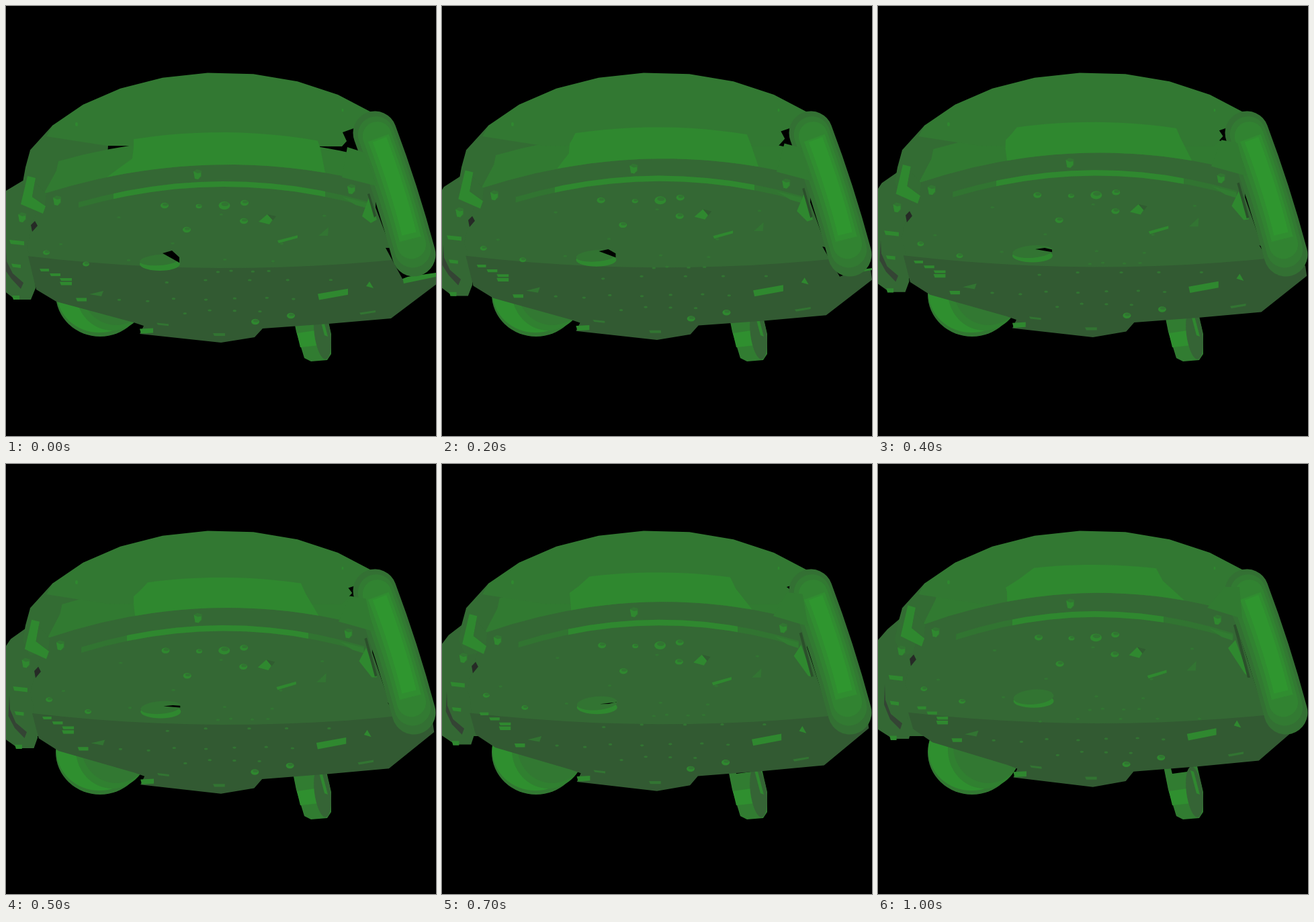
Recreate the animation shown at these times as an HTML page with a canvas. Size 640 px wide and 640 px high, loop 2100 ms.

```html
<!DOCTYPE html>
<html lang="en">
<head>
<meta charset="utf-8">
<title>Tilting shell</title>
<style>
html, body { margin: 0; width: 100%; height: 100%; overflow: hidden; background: #000; }
canvas { display: block; }
</style>
</head>
<body>
<canvas id="stage" width="640" height="640"></canvas>
<script>
const ctx = document.getElementById('stage').getContext('2d');
const LOOP = 2100, STEP = 100, STEPS = 10;
const CREST = 0.00058;
const C = {
  cover: '#327832', mid: '#317a31', bright: '#2f882f', main: '#346834',
  low: '#325a32', back: '#336c33', lit: '#2f8f2f', dim: '#327432'
};
let p = 0;

const lerp = (a, b, k = p) => a + (b - a) * k;
const mix = (a, b, k = p) => a.map((v, i) => lerp(v, b[i], k));

// Pitch of the shell: upper points rise most, sides draw inward.
function tilt(x, y) {
  const k = y - 260;
  return [x + (310 - x) * (0.044 - 0.0001 * k) * p, y + (0.09 * k - 42) * p];
}

function tilted(pts) {
  const out = [];
  for (let i = 0; i < pts.length; i += 2) out.push(...tilt(pts[i], pts[i + 1]));
  return out;
}

// Points on a shallow parabola with its top at (cx, y).
function arc(x0, x1, y, bend, cx = 325, n = 12) {
  const out = [];
  for (let i = 0; i <= n; i++) {
    const x = lerp(x0, x1, i / n);
    out.push(x, y + bend * (x - cx) ** 2);
  }
  return out;
}

// Corners of the faceted dome, 12.7 degrees apart.
function dome(from, to) {
  const out = [];
  for (let i = from; i <= to; i++) {
    const a = (9 + 12.7 * i) * Math.PI / 180;
    out.push(320 + 308 * Math.sin(a), 287 - 188 * Math.cos(a));
  }
  return out;
}

function seeded(seed) {
  return () => (seed = (seed * 16807) % 2147483647) / 2147483647;
}

function poly(color, pts) {
  ctx.fillStyle = color;
  ctx.beginPath();
  for (let i = 0; i < pts.length; i += 2) ctx.lineTo(pts[i], pts[i + 1]);
  ctx.fill();
}

const part = (color, pts) => poly(color, tilted(pts));

function oval(color, x, y, rx, ry, rot = 0) {
  ctx.fillStyle = color;
  ctx.beginPath();
  ctx.ellipse(x, y, rx, ry, rot, 0, Math.PI * 2);
  ctx.fill();
}

function wheels() {
  oval('#327832', 140, 429, 66, 63);
  oval(C.lit, 139, 426, 64, 60);
  oval('#308030', 158, 425, 54, 58);
  oval(C.cover, 164, 420, 52, 55);

  poly('#317c31', [424, 445, 432, 485, 444, 524, 454, 529, 478, 527, 484, 518, 484, 488, 474, 445]);
  poly(C.lit, [433, 487, 460, 483, 466, 505, 438, 508]);
  poly('#000', [434, 445, 470, 445, 460, 458, 438, 461]);
  oval('#356435', 471, 488, 12, 38, -0.13);
  poly(C.bright, [465, 456, 470, 458, 479, 492, 474, 490]);
}

function leftSide() {
  poly(C.main, mix(
    [-14, 300, 0, 275, 25, 260, 60, 262, 50, 330, 42, 365, 44, 420, 37, 437, 14, 437, -8, 420],
    [0, 262, 14, 246, 34, 229, 66, 226, 60, 290, 48, 335, 50, 395, 46, 409, 22, 409, 0, 395]));
  poly('#344434', mix(
    [0, 362, 1, 380, 10, 398, 26, 412, 22, 421, 8, 406, -2, 392],
    [10, 328, 11, 351, 19, 372, 36, 386, 33, 395, 18, 380, 9, 358]));
  bar(5, 351, 22, 6, 0.1);
  bar(8, 386, 14, 5, 0.1);
  bar(9, 434, 11, 6);
}

function cover() {
  poly(C.back, [25, 262, 29, 240, ...dome(-6, -5), 152, 207, 150, 240, 60, 280, 35, 285]);
  part(C.mid, [...arc(78, 535, 197, CREST, 320), ...arc(551, 55, 238, CREST, 330), 75, 245]);
  poly(C.cover, [60, 194, ...dome(-5, 3), 551, 164, 525, 181, 500, 209, 150, 208]);
  oval(C.bright, 105, 176, 2, 3);
  oval(C.bright, 501, 155, 1.5, 2.5);
}

function tube() {
  const bottom = lerp(218, 182);
  poly('#000', [lerp(501, 518), lerp(188, 181), 526, 179, 530, bottom, lerp(513, 524), bottom - 4]);
  poly('#000', mix([565, 360, 574, 360, 606, 400, 590, 406], [571, 350, 575, 360, 606, 390, 600, 390]));

  // Nested strokes shade the rounded surface from rim to highlight.
  const layers = 5;
  for (let i = 0; i < layers; i++) {
    const k = i / (layers - 1), inset = 14 * k;
    ctx.strokeStyle = `rgb(${lerp(51, 47, k)},${lerp(112, 150, k)},${lerp(51, 47, k)})`;
    ctx.lineWidth = lerp(65, 22, k);
    ctx.lineCap = i < 3 ? 'round' : 'butt';
    ctx.beginPath();
    ctx.moveTo(549 + inset * 0.5, 189 + inset * 0.7);
    ctx.quadraticCurveTo(582 + 3 * k, 277, 607 - inset * 0.5, 370 - inset * 2.2);
    ctx.stroke();
  }
  poly(C.mid, mix([508, 210, 533, 218, 552, 268, 500, 255], [516, 183, 538, 183, 542, 230, 490, 214]));
}

function shell() {
  const seam = arc(lerp(33, 45), lerp(598, 606), lerp(390, 386), -0.0002, 330);
  poly(C.main, [...tilted([...arc(55, 551, 236, CREST, 330), 550, 300]),
    575, lerp(366, 370), 600, 405, 45, 405, ...tilted([36, 372, 31, 360, 40, 322])]);
  poly(C.low, [...seam, ...tilted([592, 404, 640, 398, 642, 413, 573, 465, 480, 473, 382, 480,
    370, 493, 320, 501, 199, 488, 205, 476, 190, 471, 75, 440, 45, 422])]);

  // Lit step above the crest, its ends narrowing as it rises.
  const xl = lerp(190, 232), xr = lerp(464, 414), top = lerp(188, 150);
  const heel = 192 - 42 * Math.max(0, 1 - 2.5 * p);
  poly(C.bright, [...arc(xl, xr, top, 0.0006, 320), xr + lerp(4, 10), top + 24,
    ...tilted(arc(lerp(475, 463), heel + (heel - 310) * 0.046 * p, 236, CREST, 330)),
    lerp(188, 192), lerp(227, 190), 190, lerp(210, 184), lerp(190, 209), lerp(205, 172)]);

  const strip = tilted([...arc(108, 538, 261, 0.00066), ...arc(538, 108, 269, 0.00066)]);
  poly('#317431', strip);
  const x0 = lerp(160, 200), x1 = lerp(475, 425);
  ctx.save();
  ctx.beginPath();
  ctx.rect(x0, 180, x1 - x0, 130);
  ctx.clip();
  poly(C.bright, strip);
  ctx.restore();
}

function stud(x, y, r) {
  [x, y] = tilt(x, y);
  oval(C.bright, x, y, r, r * 0.7);
  oval(C.dim, x + 1, y - r * 0.25, r * 0.65, r * 0.35);
}

function screw(x, y) {
  [x, y] = tilt(x, y);
  poly(C.dim, [x - 6, y - 5, x - 1, y - 8, x + 6, y - 6, x + 6, y + 3, x + 1, y + 7, x - 4, y + 6]);
  poly(C.bright, [x - 6, y - 5, x, y - 2, x + 5, y - 3, x + 5, y + 2, x + 1, y + 7, x - 4, y + 6]);
}

// Flat plate: left end at (x, y), slope is rise per pixel.
function bar(x, y, len, h, slope = 0, color = C.bright) {
  const end = y + len * slope;
  part(color, [x, y - h / 2, x + len, end - h / 2, x + len, end + h / 2, x + 2, y + h / 2]);
}

function specks() {
  const rnd = seeded(7);
  const row = (x0, x1, y, gap) => {
    for (let x = x0; x <= x1; x += gap) {
      const [sx, sy] = tilt(x + 8 * rnd() - 4, y + 6 * rnd() - 3);
      oval(C.dim, sx, sy, 2.8, 1.6);
    }
  };
  row(172, 480, 312, 150);
  row(83, 480, 353, 163);
  row(180, 400, 380, 72);
  row(312, 400, 394, 26);
  row(236, 520, 409, 62);
  row(165, 450, 437, 44);
  row(265, 400, 455, 38);
}

function details() {
  specks();
  screw(285, 251);
  screw(76, 290);
  screw(514, 273);
  screw(24, 315);
  stud(236, 297, 6);
  stud(287, 298, 4.5);
  stud(325, 297, 8.5);
  stud(355, 293, 6);
  stud(354, 320, 6);
  stud(269, 333, 6);
  stud(371, 470, 6);
  stud(424, 461, 6);
  stud(60, 367, 5);
  stud(119, 384, 5);

  bar(404, 351, 30, 4, -0.26);
  bar(464, 433, 45, 9, -0.17);
  bar(526, 458, 24, 3, -0.15, C.dim);
  bar(224, 473, 18, 3, 0.1, C.dim);
  bar(308, 489, 18, 4, 0, C.dim);
  bar(199, 484, 20, 7, -0.05);
  for (let i = 0; i < 3; i++) bar(50 + 15 * i, 393 + 7 * i, 14 + 2 * i, 4);
  bar(80, 413, 18, 5);
  bar(104, 437, 16, 5);
  part(C.bright, [376, 321, 389, 310, 397, 318, 392, 325]);
  part('#315c31', [389, 310, 402, 313, 397, 319]);
  part(C.dim, [465, 342, 480, 329, 479, 342]);
  part(C.bright, [536, 417, 541, 410, 547, 420]);
  part(C.dim, [124, 429, 145, 424, 142, 432]);

  // Hook and hole on the left rim.
  part(C.bright, [32, 253, 44, 256, 39, 284, 59, 298, 55, 309, 22, 295]);
  part(C.back, [43, 262, 60, 280, 58, 297, 39, 284]);
  part('#262a26', [37, 326, 43, 320, 47, 327, 39, 336]);

  // Round port with its closing slit.
  const [x, y] = tilt(229, 380);
  oval(C.bright, x, y + 4, 30, 10);
  oval(C.dim, x, y - 2, 30, lerp(8, 11), -0.08);
  const open = Math.max(0, 1 - p / 0.75);
  poly('#000', [x + 4, y - 12 * open, x + 18, y - 16 * open, x + 29, y - 4 - 2 * open, x + 29, y - 4 + 6 * open]
    .map((v, i) => open ? v : i % 2 ? y : x));
}

function rightBits() {
  part('#317c31', [500, 284, 537, 293, 537, 301, 520, 296]);
  poly(C.bright, mix([530, 313, 540, 285, 552, 318, 543, 323], [521, 274, 532, 262, 552, 317, 546, 312]));
  poly('#2b4f2b', mix([538, 280, 541, 279, 551, 312, 548, 315], [529, 240, 533, 238, 554, 318, 550, 318]));
  const fade = Math.max(0, 1 - p / 0.4);
  poly(C.bright, [590, 404, 640, 397, 640, 397 + 6 * fade, 592, 404 + 9 * fade]
    .map((v, i) => i % 2 ? v - 14 * (1 - fade) : v));
}

function draw(now) {
  p = Math.min(STEPS, Math.floor((now % LOOP) / STEP)) / STEPS;
  ctx.fillStyle = '#000';
  ctx.fillRect(0, 0, 640, 640);
  wheels();
  leftSide();
  cover();
  shell();
  rightBits();
  tube();
  details();
}

const start = performance.now();
function loop() {
  draw(performance.now() - start);
  requestAnimationFrame(loop);
}
loop();
</script>
</body>
</html>
```
